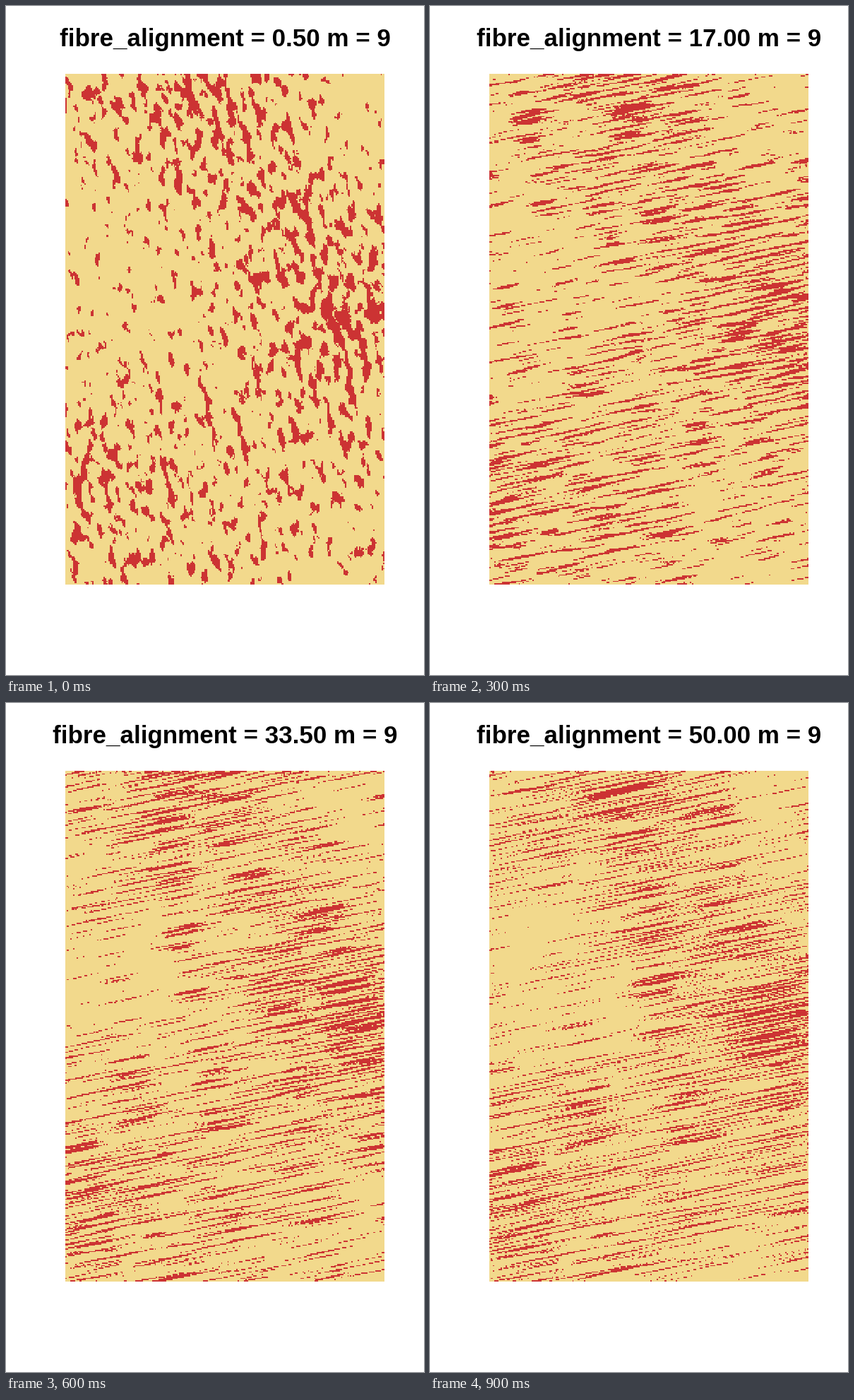
A matplotlib script that plays this animation: 592 by 947 pixels, repeating every 1000 ms.

```python
import numpy as np
import matplotlib.pyplot as plt
from matplotlib.animation import FuncAnimation
from matplotlib.colors import ListedColormap

W, H, DPI = 592, 947, 100
INSET = 0.01  # keeps the image edges from spilling into the next pixel
LEFT, RIGHT, TOP, BOTTOM = 84 + INSET, 536 - INSET, 96 + INSET, 819 - INSET
COLS, ROWS = 250, 400
FRAMES = 10
TILT = np.radians(11.5)
LATTICE = 18.0
COVERAGE = 0.185

SIZE = 512
angles = np.random.default_rng(9).uniform(0, 2 * np.pi, (SIZE, SIZE))
GRAD_X, GRAD_Y = np.cos(angles), np.sin(angles)


def fade(t):
    return t * t * t * (t * (6 * t - 15) + 10)


def perlin(x, y):
    ix, iy = np.floor(x).astype(int), np.floor(y).astype(int)
    fx, fy = x - ix, y - iy

    def corner(dx, dy):
        cell = (ix + dx) % SIZE, (iy + dy) % SIZE
        return GRAD_X[cell] * (fx - dx) + GRAD_Y[cell] * (fy - dy)

    a, b = fade(fx), fade(fy)
    low = corner(0, 0) * (1 - a) + corner(1, 0) * a
    high = corner(0, 1) * (1 - a) + corner(1, 1) * a
    return low * (1 - b) + high * b


def octave_noise(x, y, octaves=4, roughness=0.45):
    total = sum(roughness ** k * perlin(x * 2 ** k + 37.37 * k,
                                        y * 2 ** k + 71.61 * k)
                for k in range(octaves))
    return total / total.std()


# Cell centres, measured from the lower left corner of the tissue
X, Y = np.meshgrid((np.arange(COLS) + .5) * (RIGHT - LEFT) / COLS,
                   (np.arange(ROWS) + .5) * (BOTTOM - TOP) / ROWS)
ALONG = X * np.cos(TILT) + Y * np.sin(TILT)
ACROSS = Y * np.cos(TILT) - X * np.sin(TILT)


def bump(x, y, radius):
    distance2 = (X + LEFT - x) ** 2 + (BOTTOM - Y - y) ** 2
    return np.exp(-distance2 / (2 * radius ** 2))


# Tissue density stays in place while the fibres stretch
DENSITY = (0.9 * bump(270, 110, 75) + 0.6 * bump(400, 300, 65)
           + 1.1 * bump(500, 455, 65) + 0.5 * bump(130, 670, 75)
           - 0.7 * bump(150, 390, 95) - 0.8 * bump(500, 160, 65)
           - 0.4 * bump(460, 790, 70))


def alignment(frame):
    return 0.5 + 5.5 * frame


def fibrosis(frame):
    stretch = np.sqrt(alignment(frame))
    u, v = ALONG / stretch, ACROSS * stretch
    clumps = perlin(u / 20 + 150.3, v / 55 + 90.7)
    field = (octave_noise(u / LATTICE, v / LATTICE) + DENSITY
             + 8 * np.maximum(clumps - 0.32, 0))
    return field > np.quantile(field, 1 - COVERAGE)


fig = plt.figure(figsize=(W / DPI, H / DPI), dpi=DPI, facecolor="white")
ax = fig.add_axes([0, 0, 1, 1])
tissue = ax.imshow(np.zeros((ROWS, COLS)), vmin=0, vmax=1, origin="lower",
                   cmap=ListedColormap(["#F2D98C", "#CC3333"]),
                   extent=(LEFT, RIGHT, BOTTOM, TOP), aspect="auto",
                   interpolation="nearest")
ax.set(xlim=(0, W), ylim=(H, 0))
ax.axis("off")
title = ax.text((LEFT + RIGHT) / 2, 57, "", ha="center", va="baseline",
                family="Liberation Sans", weight="bold", color="black",
                size=35 * 72 / DPI)


def draw(frame):
    tissue.set_data(fibrosis(frame).astype(float))
    title.set_text(f"fibre_alignment = {alignment(frame):.2f} m = 9")
    return tissue, title


anim = FuncAnimation(fig, draw, frames=FRAMES, interval=100, repeat=True,
                     repeat_delay=0)
plt.show()
```
